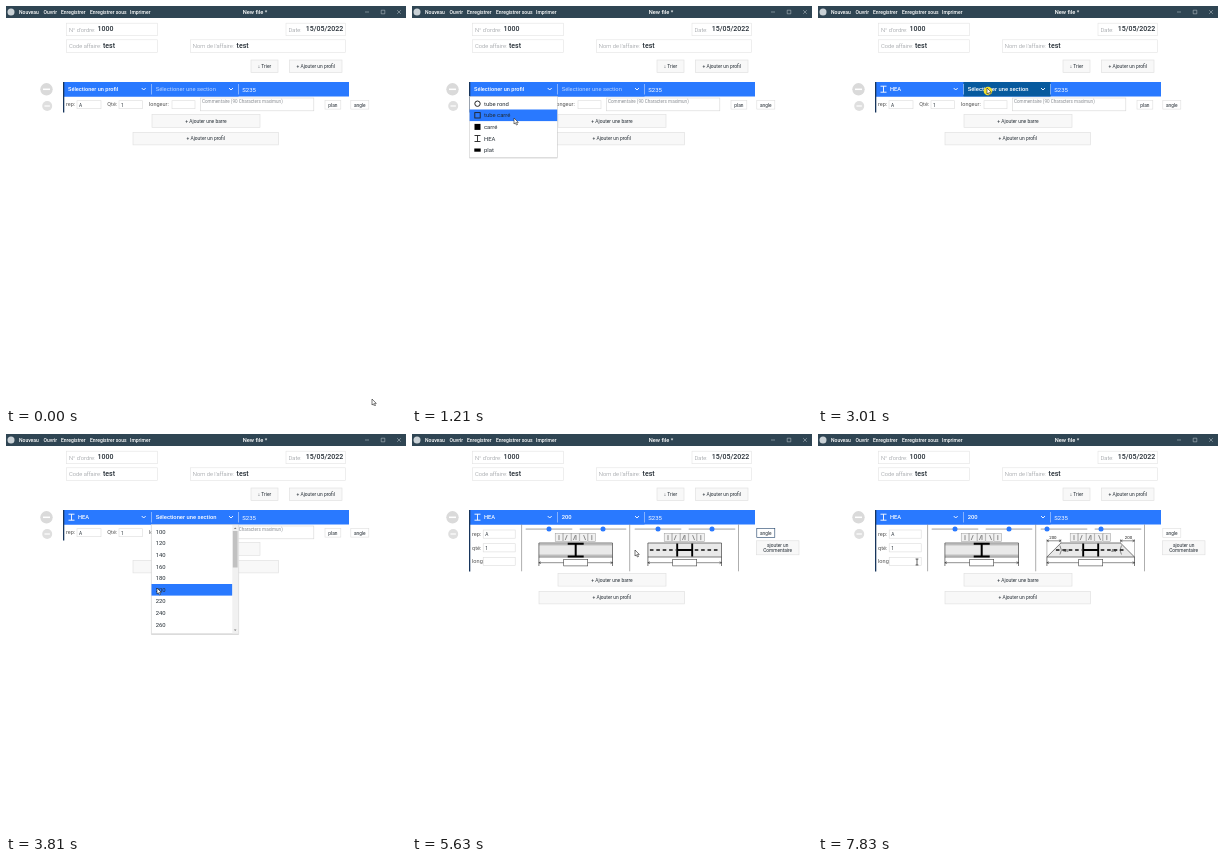
Animation of 400x400 px, one loop 8 s. Source, as an HTML page:

```html
<!DOCTYPE html>
<html lang="fr">
<head>
<meta charset="utf-8">
<style>
  html, body { margin: 0; width: 100%; height: 100%; overflow: hidden; background: #fff; }
  svg { display: block; width: 100vw; height: 100vh; font-family: Roboto, Arial, sans-serif; }
</style>
</head>
<body>
<svg id="stage" viewBox="0 0 400 400"></svg>
<script>
const STEP = 200, LOOP = 8000;
const BLUE = '#2979ff', HOVER = '#075a9e', INK = '#222b33', GREY = '#8b8f94';
const stage = document.getElementById('stage');

// Pointer tip at each step
const pointer = [
  [366, 393], [335, 335], [255, 225], [155, 115], [112, 84], [108, 88], [102, 112],
  [97, 122], [91, 130], [91, 131], [100, 120], [108, 108], [114, 98],
  [125, 86], [158, 83], [169, 82], [167, 90], [160, 118], [154, 143],
  [151, 154], [151, 154], [195, 140], [265, 115], [315, 97], [335, 98],
  [352, 98], [352, 98], [300, 107], [223, 116], [237, 104], [246, 95],
  [238, 95], [230, 95], [290, 96], [292, 95], [284, 95], [233, 119],
  [190, 123], [130, 126], [99, 128]
];

// Drawing helpers
const text = (x, y, s, size = 5.6, fill = INK, weight = 400, anchor = 'start') =>
  `<text x="${x}" y="${y}" font-size="${size}" fill="${fill}" font-weight="${weight}" text-anchor="${anchor}">${s}</text>`;
const rect = (x, y, w, h, fill = '#fff', stroke = 'none', sw = .6, extra = '') =>
  `<rect x="${x}" y="${y}" width="${w}" height="${h}" fill="${fill}" stroke="${stroke}" stroke-width="${sw}" ${extra}/>`;
const path = (d, stroke = INK, sw = .6, fill = 'none', extra = '') =>
  `<path d="${d}" stroke="${stroke}" stroke-width="${sw}" fill="${fill}" ${extra}/>`;
const circle = (x, y, r, fill, stroke = 'none') =>
  `<circle cx="${x}" cy="${y}" r="${r}" fill="${fill}" stroke="${stroke}"/>`;
const button = (x, y, w, h, label, size = 4.9, fill = '#f8f8f8', stroke = '#dedede') =>
  rect(x, y, w, h, fill, stroke) + text(x + w / 2, y + h / 2 + 1.8, label, size, INK, 400, 'middle');
const input = (x, y, w, h, value = '') =>
  rect(x, y, w, h, '#fff', '#dcdcdc') + text(x + 2, y + h / 2 + 1.8, value, 4.8);
const field = (x, y, w, label, value, gap) =>
  rect(x, y, w, 12.5, '#fff', '#e3e3e3') + text(x + 2.5, y + 8.4, label, 5.8, GREY, 300) +
  text(x + gap, y + 8.2, value, 7, INK, 500);
const chevron = x => path(`M${x - 2} 82l2 2l2-2`, '#fff', .9);
const dropShadow = (x, y, w, h) =>
  rect(x - .6, y, w + 1.2, h + 1.4, '#000', 'none', 0, 'opacity=".14" rx="1"') + rect(x, y, w, h, '#fff', '#d5d5d5', .4);

const beamIcon = (y, color) => path(`M62.5 ${y - 3}h6M62.5 ${y + 3}h6M65.5 ${y - 3}v6`, color, .9);
const profiles = [
  ['tube rond', y => circle(65.5, y, 2.7, 'none', '#222')],
  ['tube carré', y => rect(62.8, y - 2.7, 5.4, 5.4, 'none', '#222', .9)],
  ['carré', y => rect(62.5, y - 3, 6, 6, '#000')],
  ['HEA', y => beamIcon(y, '#222')],
  ['plat', y => rect(62.3, y - 1.6, 6.4, 3.2, '#000')]
];

function windowChrome() {
  const menu = [[13, 'Nouveau'], [37.5, 'Ouvrir'], [55, 'Enregistrer'], [84, 'Enregistrer sous'], [124, 'Imprimer']];
  return rect(0, 0, 400, 400) + rect(0, 0, 400, 12, '#2f4553') + circle(5, 6, 3.5, '#c9d1d6') +
    menu.map(([x, s]) => text(x, 7.8, s, 5, '#fff', 500)).join('') +
    text(249, 7.9, 'New file *', 5.7, '#fff', 500, 'middle') +
    path('M359 6h4M375.2 4.2h3.6v3.6h-3.6zM391.2 4.2l3.6 3.6m0-3.6l-3.6 3.6', '#c3ccd2', .5);
}

function orderForm() {
  return field(60.5, 17.2, 91, "N° d'ordre:", '1000', 31) +
    field(280, 17.2, 59.5, 'Date:', '15/05/2022', 19.8) +
    field(60.5, 33.8, 91, 'Code affaire:', 'test', 36.5) +
    field(184.3, 33.8, 155, "Nom de l'affaire:", 'test', 46.3) +
    button(245, 54, 27, 12.5, '↓ Trier') + button(283.5, 54, 52.5, 12.5, '+ Ajouter un profil') +
    circle(40.5, 83.3, 6.2, '#dadada') + path('M37 83.3h7', '#fff', 1.5) +
    circle(41.2, 100, 5, '#dfdfdf') + path('M38.5 100h5.4', '#fff', 1.2);
}

function profileBar(s) {
  const chosen = s >= 9, [px, py] = pointer[s];
  const over = py >= 76 && py < 90.5;
  const fill = (from, to) => over && px >= from && px < to ? HOVER : BLUE;
  return rect(57, 76, 286, 14.5, BLUE) + rect(58, 76, 87.5, 14.5, fill(58, 145)) +
    rect(145.5, 76, 87, 14.5, fill(145, 232)) +
    (chosen ? beamIcon(83.2, '#fff') + text(72, 85.4, 'HEA', 5.7, '#fff', 500)
            : text(62, 85.4, 'Sélectioner un profil', 5.6, '#fff', 500)) +
    text(149.7, 85.4, s >= 20 ? '200' : 'Sélectioner une section', 5.8, chosen ? '#fff' : '#bcd5ff', chosen ? 500 : 400) +
    text(236.3, 85.7, 'S235', 6, '#fff') + chevron(137.7) + chevron(225) +
    path('M145.5 78v10.5M232.5 78v10.5', '#c4dbff', .6);
}

function simpleRow() {
  return rect(57, 76, 1.3, 30.5, '#17355c') +
    text(60, 100.3, 'rep:', 5.5, '#555') + input(71, 94.7, 24, 8, 'A') +
    text(101.3, 100.3, 'Qté:', 5.5, '#555') + input(113, 94.7, 23.5, 8, '1') +
    text(143, 100.3, 'longeur:', 5.5, '#555') + input(166, 94.7, 23, 8) +
    rect(194.3, 92, 113.5, 12.8, '#fff', '#d6d6d6') +
    text(196, 97.4, 'Commentaire (90 Characters maximun)', 4.6, GREY) +
    button(319, 94.3, 15.8, 8.8, 'plan', 4.8, '#fff') + button(344.8, 94.3, 18, 8.8, 'angle', 4.8, '#fff') +
    button(146, 108.3, 108, 13, '+ Ajouter une barre') + button(127, 126.3, 145.5, 12.6, '+ Ajouter un profil');
}

const slider = (mid, angle) => rect(mid - 23.5, 94.2, 47, 1.8, '#c9c9c9', 'none', 0, 'rx=".9"') +
  circle(mid - 17 * angle / 45, 95.1, 2.5, BLUE);

function presets(c) {
  const marks = ['v5', 'l-2 5', 'l-2 5m2.6-5v5', 'l2 5', 'v5'];
  return marks.map((d, i) => {
    const x = c - 20.5 + i * 8.2;
    return rect(x, 99.6, 7.6, 8, '#f1f1f1', '#999', .5) + path(`M${x + 3.8} 101.1${d}`, '#444', .6);
  }).join('');
}

const arrowLine = (a, b, y) => path(`M${a} ${y}H${b}M${a + 2} ${y - 1}l-2 1l2 1M${b - 2} ${y - 1}l2 1l-2 1`, '#222', .5);

function cutLabel(edge, side, angle) {
  if (!angle) return '';
  const slope = Math.tan(angle * Math.PI / 180);
  const low = edge + side * 7 * slope, high = edge - side * 7 * slope;
  return path(`M${low} 105v18M${high} 105v4`, '#555', .4) +
    arrowLine(Math.min(low, high), Math.max(low, high), 106.8) +
    text(edge + side, 105, Math.round(200 * slope), 4.4, '#222', 400, 'middle') +
    text(edge - side * 13, 117.6, angle + '°', 4.4, '#222', 400, 'middle') +
    path(`M${edge - side * 6} 111.5q${-side * 3} 5 0 9`, '#222', .5);
}

function beamView(c, left, right, topView) {
  const shift = a => 7 * Math.tan(a * Math.PI / 180);
  const l = c - 36.8, r = c + 36.8, ls = shift(left), rs = shift(right);
  const body = `M${l + ls} 109H${r - rs}L${r + rs} 123H${l - ls}Z`;
  const details = topView
    ? path(`M${l + 2} 116H${r - 2}`, '#111', 1.3, 'none', 'stroke-dasharray="3.6 2.8"') +
      rect(c - 9, 114, 18, 4, '#e9e9e9') +
      path(`M${c - 7.5} 109.5v13M${c + 7.5} 109.5v13M${c - 7.5} 116h15`, '#000', 1.9)
    : path(`M${l} 110.8H${r}M${l} 121.2H${r}`, '#666', .5) +
      path(`M${c - 8} 109.8h16M${c - 8} 122.4h16M${c} 109.8v12.6`, '#000', 2);
  return slider(c - 26.7, left) + slider(c + 27.3, right) + presets(c) +
    path(body, '#444', .7, '#e9e9e9') + details +
    path(`M${l - ls} 123v9M${r + rs} 123v9`, '#222', .6) + arrowLine(l - ls, r + rs, 128.7) +
    rect(c - 12, 125.5, 24, 6.4, '#fff', '#444', .6) +
    cutLabel(l, -1, left) + cutLabel(r, 1, right);
}

function detailRow(s) {
  const left = s < 31 ? 0 : s < 32 ? 20 : 45;
  const right = s < 34 ? 0 : s < 35 ? 22 : 45;
  const rows = [['rep:', 'A'], ['qté:', '1'], ['long:', '']];
  return rect(57, 76, 1.3, 61.5, '#17355c') +
    rows.map(([label, value], i) => text(60, 102 + i * 13.6, label, 5.6, '#555') +
      input(71.2, 96 + i * 13.7, 32, 8.2, value)).join('') +
    path('M109.6 90.5V137.3M217.7 90.5V137.3M326.5 90.5V137.3', '#777', .6) +
    beamView(163.7, 0, 0, false) + beamView(272.7, left, right, true) +
    button(344.8, 94.5, 18, 8.8, 'angle', 4.8, '#fff', s < 31 ? '#1c3f66' : '#dedede') +
    rect(344.5, 106.8, 42.5, 14, '#f8f8f8', '#dedede') +
    text(365.7, 113, 'ajouter un', 4.8, INK, 400, 'middle') +
    text(365.7, 118.2, 'Commentaire', 4.8, INK, 400, 'middle') +
    button(146, 139.3, 108, 12.8, '+ Ajouter une barre') + button(127, 157.3, 145.5, 12.6, '+ Ajouter un profil');
}

function profileMenu(y) {
  return dropShadow(57.6, 90.6, 87.6, 60.6) + profiles.map(([name, icon], i) => {
    const mid = 97.7 + i * 11.6, active = Math.abs(y + 1 - mid) < 5.8;
    return (active ? rect(57.6, mid - 5.8, 87.6, 11.6, BLUE) : '') + icon(mid) + text(72, mid + 2, name, 5.9);
  }).join('');
}

function sectionMenu(y) {
  const sizes = Array.from({ length: 9 }, (_, i) => 100 + i * 20);
  return dropShadow(145.5, 90.6, 87, 109) + sizes.map((size, i) => {
    const mid = 97.8 + i * 11.6, active = Math.abs(y + 1 - mid) < 5.8;
    return (active ? rect(145.5, mid - 5.8, 81, 11.6, BLUE) : '') + text(149.7, mid + 2, size, 5.9);
  }).join('') + rect(226.3, 91, 5.8, 108.4, '#f1f1f1') + rect(226.8, 97, 4.8, 36.5, '#c1c1c1') +
    path('M227.9 95l1.3-1.5l1.3 1.5zM227.9 195.5l1.3 1.5l1.3-1.5z', 'none', 0, '#777');
}

function cursor(s) {
  const [x, y] = pointer[s];
  if (s === 23 || s === 39) return path(`M${x - 1.4} ${y - 3}h2.8M${x} ${y - 3}v6M${x - 1.4} ${y + 3}h2.8`, '#222', .7);
  const halo = s === 15 ? circle(x + 1, y + 3, 4.3, '#f2df2e') : '';
  return halo + path(`M${x} ${y}v6l1.4-1.2l1 2.2l1.1-.5l-1-2.1h1.8z`, '#222', .6, '#fff');
}

function draw(s) {
  const y = pointer[s][1];
  stage.innerHTML = windowChrome() + orderForm() + profileBar(s) +
    (s < 26 ? simpleRow() : detailRow(s)) +
    (s >= 5 && s < 9 ? profileMenu(y) : '') +
    (s >= 16 && s < 20 ? sectionMenu(y) : '') + cursor(s);
}

let shown = -1;
function tick() {
  const s = Math.floor(performance.now() % LOOP / STEP);
  if (s !== shown) draw(shown = s);
  requestAnimationFrame(tick);
}
tick();
</script>
</body>
</html>
```
